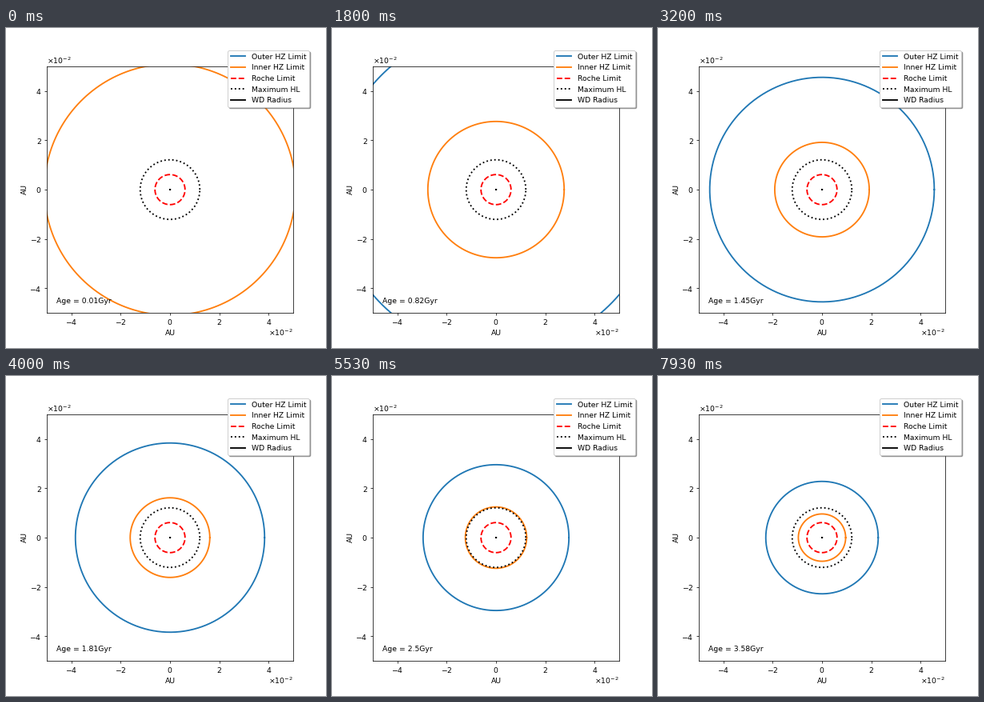
Write a matplotlib script that moves like this. It is 400x400 px and loops after 8000 ms.

```python
import numpy as np
import matplotlib.pyplot as plt
from matplotlib.animation import FuncAnimation

LOOP_MS, TICK_MS = 8000, 20
STEPS_PER_S = 15
LEAD_MS = 14                          # keeps each step on its nearest tick
AGE_START, AGE_STEP = 0.01, 0.03      # Gyr
OUTER_HZ, INNER_HZ = 2.118, 0.8915    # AU at one solar luminosity
ROCHE, MAX_HL, WD_RADIUS = 0.0061, 0.0121, 4.6e-5

plt.rcParams["font.family"] = "DejaVu Sans"
theta = np.linspace(0, 2 * np.pi, 400)


def circle(r):
    return r * np.cos(theta), r * np.sin(theta)


def luminosity(age):
    """Cooling white dwarf, in solar units."""
    return 10 ** (-2.478 - 0.7505 * age + 0.1199 * age**2 - 0.0067 * age**3)


fig, ax = plt.subplots(figsize=(6, 6), dpi=400 / 6)


def ring(r, color, style, label):
    return ax.plot(*circle(r), color=color, ls=style, lw=2, label=label)[0]


outer = ring(1, "C0", "-", "Outer HZ Limit")
inner = ring(1, "C1", "-", "Inner HZ Limit")
ring(ROCHE, "red", "--", "Roche Limit")
ring(MAX_HL, "black", ":", "Maximum HL")
ring(WD_RADIUS, "black", "-", "WD Radius")
age_text = ax.text(-0.046, -0.046, "")

ax.set_aspect("equal")
ax.set_xlim(-0.05, 0.05)
ax.set_ylim(-0.05, 0.05)
ax.set_xlabel("AU", labelpad=3.5)
ax.set_ylabel("AU", labelpad=2)
ax.ticklabel_format(style="sci", scilimits=(0, 0), useMathText=True)
ax.xaxis.OFFSETTEXTPAD = 1
ax.legend(loc="upper right", bbox_to_anchor=(1.08, 1.08), shadow=True)


def draw(i):
    step = (i * TICK_MS + LEAD_MS) * STEPS_PER_S // 1000
    age = AGE_START + AGE_STEP * step
    scale = np.sqrt(luminosity(age))
    outer.set_data(*circle(OUTER_HZ * scale))
    inner.set_data(*circle(INNER_HZ * scale))
    age_text.set_text(f"Age = {round(age, 2)}Gyr")
    return outer, inner, age_text


anim = FuncAnimation(fig, draw, frames=LOOP_MS // TICK_MS, interval=TICK_MS,
                     init_func=lambda: draw(0), repeat=True, repeat_delay=0)
plt.show()
```
